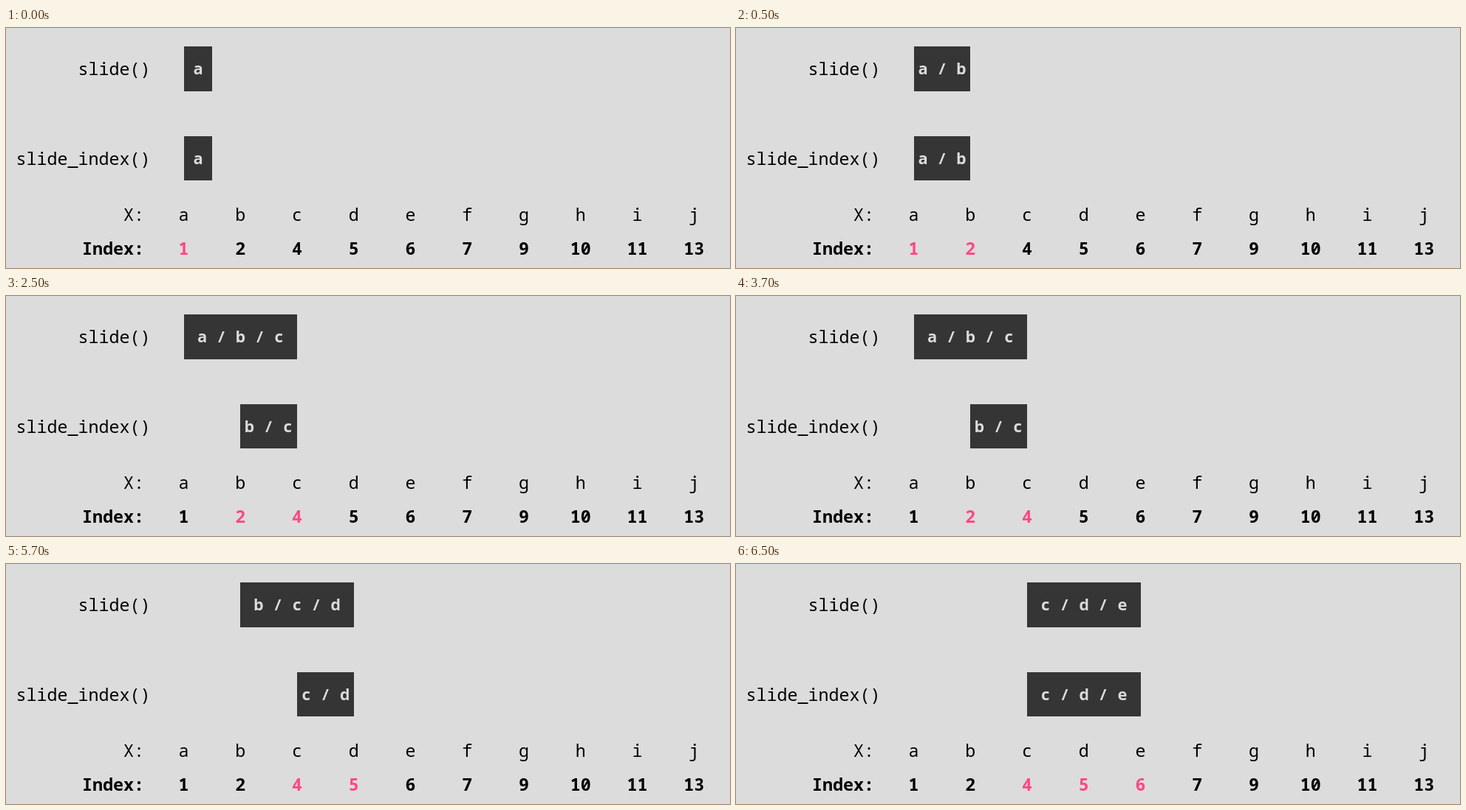
An HTML page with a canvas that plays this animation: 980 by 326 pixels, repeating every 8 s.

```html
<!DOCTYPE html>
<html lang="en">
<head>
<meta charset="utf-8">
<title>Sliding windows</title>
<style>
  html, body { margin: 0; width: 100%; height: 100%; overflow: hidden; background: #dcdcdc; }
  canvas { display: block; width: 980px; height: 326px; }
</style>
</head>
<body>
<canvas id="stage"></canvas>
<script>
const W = 980, H = 326, LOOP = 8000;
const BG = '#dcdcdc', INK = '#000', BOX = '#353535', PINK = '#ff4785';
const LETTERS = 'abcdefghij';
const INDEX = [1, 2, 4, 5, 6, 7, 9, 10, 11, 13];
const LABEL_SIZE = 23.33, BOX_SIZE = 21.67;
const REACH = 2;

const canvas = document.getElementById('stage');
const ratio = window.devicePixelRatio || 1;
canvas.width = W * ratio;
canvas.height = H * ratio;
const ctx = canvas.getContext('2d');
ctx.scale(ratio, ratio);

const columnX = i => 240.6 + i * 76.73;

function text(str, x, y, { size = LABEL_SIZE, weight = 400, color = INK, align = 'center' } = {}) {
  ctx.font = `${weight} ${size}px "Noto Sans Mono", "DejaVu Sans Mono", monospace`;
  ctx.textAlign = align;
  ctx.fillStyle = color;
  ctx.fillText(str, x, y);
}

// A single item still gets a box half a column wide.
function windowBox(first, last, top, height) {
  const left = Math.round(columnX(first));
  const right = Math.round(first === last ? left + 38 : columnX(last));
  ctx.fillStyle = BOX;
  ctx.fillRect(left, top, right - left, height);
  const label = [...LETTERS.slice(first, last + 1)].join(' / ');
  text(label, (left + right) / 2, top + 38, { size: BOX_SIZE, weight: 700, color: BG });
}

function draw(current) {
  ctx.fillStyle = BG;
  ctx.fillRect(0, 0, W, H);

  const firstByCount = Math.max(0, current - REACH);
  const firstByIndex = INDEX.findIndex(v => v >= INDEX[current] - REACH);

  text('slide()', 195.5, 64, { align: 'right' });
  text('slide_index()', 195.5, 186, { align: 'right' });
  text('X:', 187, 262, { align: 'right' });
  text('Index:', 187, 308, { align: 'right', weight: 700 });

  windowBox(firstByCount, current, 25, 61);
  windowBox(firstByIndex, current, 147, 60);

  INDEX.forEach((value, i) => {
    const active = i >= firstByIndex && i <= current;
    text(LETTERS[i], columnX(i), 262);
    text(value, columnX(i), 308, { weight: 700, color: active ? PINK : INK });
  });
}

// The loop opens 1500 ms into the first two-second step.
function tick() {
  const t = performance.now() % LOOP;
  draw(Math.floor((t + 1500) / 2000));
  requestAnimationFrame(tick);
}
tick();
</script>
</body>
</html>
```
